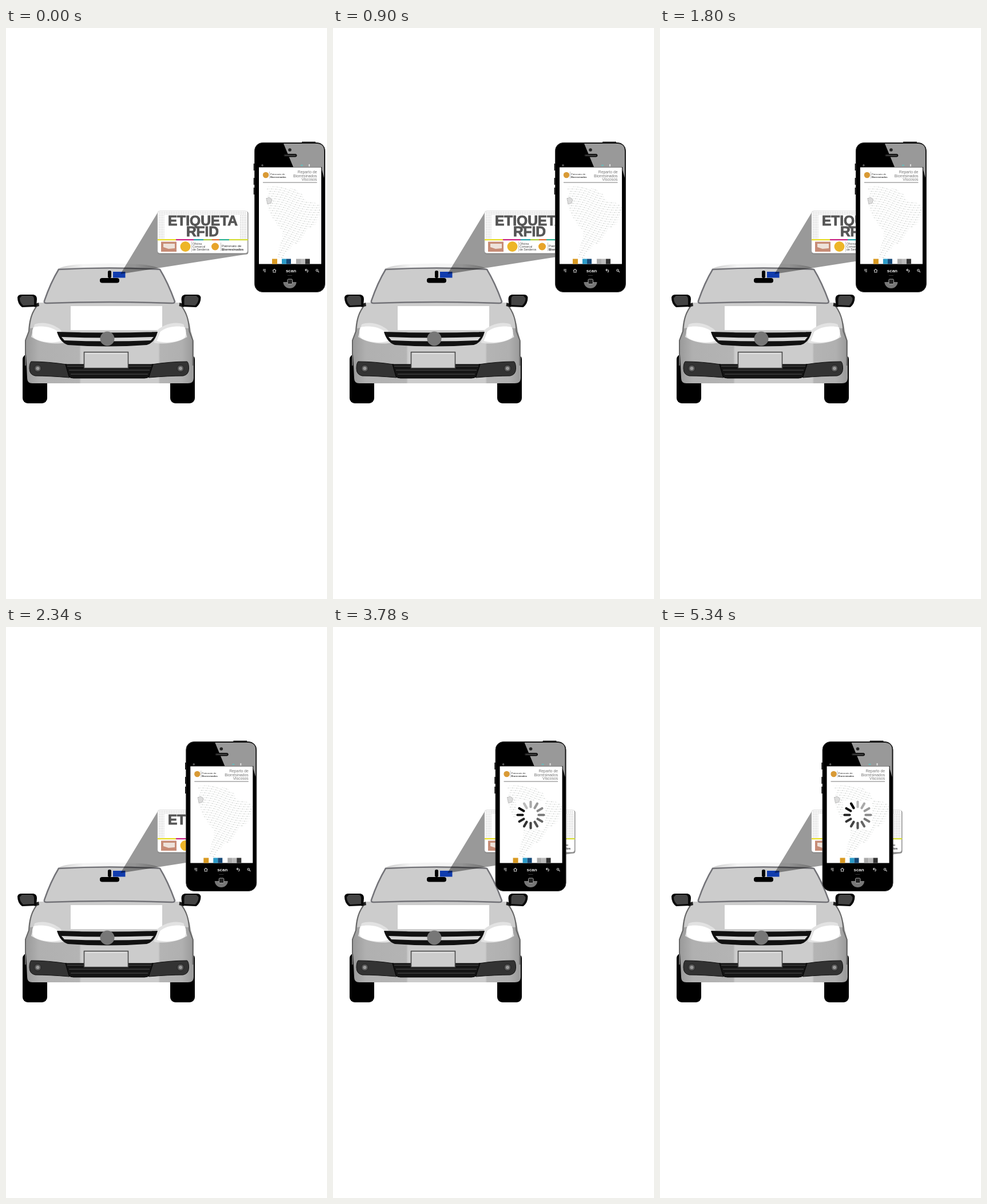
Recreate the animation shown at these times as an HTML page. Size 561x998 px, loop 5.4 s.

```html
<!DOCTYPE html>
<html lang="es">
<head>
<meta charset="utf-8">
<title>Etiqueta RFID</title>
<style>
html, body { margin: 0; width: 100%; height: 100%; overflow: hidden; background: #fff; }
svg { display: block; width: 100vw; height: 100vh; font-family: "Liberation Sans", Arial, sans-serif; }
</style>
</head>
<body>
<svg viewBox="0 0 561 998">
  <defs>
    <linearGradient id="roof">
      <stop offset="0" stop-color="#ccc"/><stop offset=".25" stop-color="#f4f4f4"/>
      <stop offset=".75" stop-color="#f4f4f4"/><stop offset="1" stop-color="#bbb"/>
    </linearGradient>
    <linearGradient id="paint">
      <stop offset="0" stop-color="#999"/><stop offset=".08" stop-color="#b0b0b0"/>
      <stop offset=".32" stop-color="#b4b4b4"/><stop offset=".33" stop-color="#ccc"/>
      <stop offset=".79" stop-color="#ccc"/><stop offset=".8" stop-color="#b4b4b4"/>
      <stop offset=".93" stop-color="#b0b0b0"/><stop offset="1" stop-color="#999"/>
    </linearGradient>
    <clipPath id="land">
      <path d="M449 271L454 278 468 277 486 278 505 282 518 291 521 300 548 308 551 317 545 336 539 346 527 350 520 363 511 376 500 379 496 387 487 393 486 403 475 401 477 385 482 370 484 355 473 343 462 326 457 312 455 300 460 288Z"/>
    </clipPath>
    <g id="side">
      <path d="M57 482C45 496 41 510 40 530L34 546V590" fill="none" stroke="#666" stroke-width="2"/>
      <path d="M50 518C66 512 84 518 96 528L102 550C82 554 60 550 44 540Z" fill="#e2e2e2"/>
      <path d="M48 523C64 519 82 523 91 531L97 547C82 552 58 549 48 541Q44 532 48 523Z" fill="#fff"/>
      <path d="M48 483L57 480 58 486 50 488Z" fill="#222"/>
      <path d="M27 466H48Q54 467 54 474L53 487 28 488Q20 482 20 471Q21 466 27 466Z" fill="#080808"/>
      <path d="M28 468H45Q49 469 49 474V484L30 485Q24 480 24 472Z" fill="#444"/>
      <path d="M44 583Q72 583 106 588L111 611Q75 608 51 608Q41 606 41 595Q41 586 44 583Z" fill="#333" stroke="#111"/>
      <circle cx="55.500" cy="595" r="6" fill="#555" stroke="#222"/>
      <circle cx="55.500" cy="595" r="3" fill="#999"/>
    </g>
  </defs>

  <g id="car">
    <rect x="29" y="570" width="43" height="86" rx="9"/>
    <rect x="287" y="570" width="43" height="86" rx="9"/>
    <path d="M55 482H304Q320 502 323 530L328 548V612Q328 621 318 621H46Q37 621 37 612L34 548 40 530Q42 502 55 482Z" fill="url(#paint)"/>
    <path d="M57 480H303Q317 500 321 525Q290 522 268 531H94Q68 519 42 525Q44 498 57 480Z" fill="#ccc"/>
    <path d="M113 486H273V528H113Z" fill="#fff"/>
    <path d="M90 422Q98 415 130 413Q181 410 232 413Q262 415 270 422Z" fill="url(#roof)"/>
    <path d="M92 422Q181 417 269 422Q283 445 295 478Q295 481 290 481Q181 477 71 481Q66 481 67 477Q78 445 92 422Z" fill="#ccc" stroke="#737378" stroke-width="2.500"/>
    <rect x="178" y="424" width="6" height="13" rx="2.500"/>
    <rect x="164" y="437" width="34" height="8.500" rx="4"/>
    <rect x="187" y="426" width="21.500" height="10.500" fill="#103cae"/>
    <use href="#side"/>
    <use href="#side" transform="translate(360.500 0) scale(-1 1)"/>
    <path d="M89 531Q177 534 265 531Q260 550 246 554Q177 559 108 554Q94 549 89 531Z" fill="#111"/>
    <path d="M97 540Q177 543 258 540L253 546Q177 549 102 546Z" fill="#d6d6d6"/>
    <circle cx="177" cy="543" r="12.500" fill="#777"/>
    <path d="M104 588H257L250 609Q248 612 242 612H118Q112 612 110 609Z" fill="#151515" stroke="#000"/>
    <path d="M107 591H254M110 598H251M113 605H248" stroke="#555"/>
    <rect x="136.500" y="566.500" width="77" height="28" fill="#ccc" stroke="#444" stroke-width="1.500"/>
    <path d="M139 569H211" stroke="#eee"/>
  </g>

  <path d="M200 430L266 321 423 395Z" opacity=".4"/>

  <g id="card">
    <rect x="265" y="320.500" width="158.500" height="75" rx="4" fill="#888"/>
    <rect x="265" y="319.500" width="157" height="74" rx="4" fill="#fff" stroke="#ccc" stroke-width=".6"/>
    <g id="print" stroke="#bbb" stroke-width="1" stroke-dasharray="2 1"></g>
    <g font-size="24.500" font-weight="700" text-anchor="middle" fill="#555" stroke="#555" stroke-width=".9">
      <text x="344" y="345">ETIQUETA</text>
      <text x="343.500" y="364">RFID</text>
    </g>
    <g id="strip"></g>
    <rect x="271" y="373.500" width="27" height="17.500" fill="#c78c76"/>
    <path d="M275 377H295V385L284 386 275 383Z" fill="#eee2da"/>
    <circle cx="313.500" cy="382" r="9" fill="#edb528"/>
    <path d="M324.500 373V391" stroke="#999" stroke-width=".6"/>
    <g font-size="5.200" fill="#444">
      <text x="326" y="379">Oficina</text>
      <text x="326" y="384">Comarcal</text>
      <text x="326" y="389">de Senderos</text>
    </g>
    <circle cx="365.500" cy="382" r="6.500" fill="#e7a42a"/>
    <path d="M375.500 375V390" stroke="#999" stroke-width=".6"/>
    <g font-size="6" fill="#333">
      <text x="377" y="382.500">Patronato de</text>
      <text x="377" y="389" font-weight="700" font-size="5.700">Biorresinados</text>
    </g>
  </g>

  <g id="phone">
    <path d="M517 200H541M434 237V249M434 262V274M434 279V291" stroke="#000" stroke-width="2.500"/>
    <rect x="434.500" y="200.500" width="123" height="261" rx="14" stroke="#333"/>
    <path d="M485 202H544Q556 203 556 215V262L552 248V243H502Z" fill="#999"/>
    <circle cx="496" cy="213" r="2.800" fill="#222"/>
    <rect x="485" y="220.500" width="23" height="4.500" rx="2.200" fill="#222" stroke="#000"/>
    <path d="M488 222.700H505" stroke="#777" stroke-dasharray="1 1"/>
    <path d="M446 240H450M448 238V242" stroke="#777"/>
    <path d="M515 240H519" stroke="#6bb" stroke-width="2"/>
    <path d="M530 238V242" stroke="#ddd" stroke-width="2"/>
    <rect x="442" y="243.500" width="109" height="169" fill="#fff"/>
    <circle cx="454" cy="257" r="5.200" fill="#d99a35"/>
    <path d="M460.500 251V263" stroke="#999" stroke-width=".6"/>
    <g font-size="4.400" fill="#333">
      <text x="462" y="257">Patronato de</text>
      <text x="462" y="261.500" font-weight="700" font-size="4.100">Biorresinados</text>
    </g>
    <g font-size="6.800" fill="#777" text-anchor="end">
      <text x="543.500" y="254">Reparto de</text>
      <text x="543.500" y="260.500">Biorresinados</text>
      <text x="543.500" y="267">Viscosos</text>
    </g>
    <path d="M449 270H543.500" stroke="#bbb" stroke-width="1.800"/>
    <g id="map" clip-path="url(#land)" fill="none" stroke="#c3c8c5" stroke-width=".9"></g>
    <path d="M455 298L460 296 465 300 463 306 457 308Z" fill="#ddd" stroke="#aaa" stroke-dasharray="2 1"/>
    <g id="swatches"></g>
    <g fill="none" stroke="#ccc" stroke-width="1.100">
      <path d="M449 422H454M449 424H454M451 426H454M466 424L469 421.500 472 424M467 424V427H471V424M523 423H527Q529 425 526 427M525 421L523 423 525 425"/>
      <circle cx="543.500" cy="423.500" r="1.700"/>
      <path d="M545 425L547 427"/>
    </g>
    <text x="498" y="427" font-size="8" font-weight="700" fill="#eee" text-anchor="middle">scan</text>
    <path d="M492 432.500H500" stroke="#333"/>
    <path d="M484.500 444H507.500A11.500 11 0 0 1 484.500 444Z" fill="#777"/>
    <rect x="492" y="439" width="8.500" height="8.500" rx="1.500" fill="#222" stroke="#aaa"/>
  </g>

  <g id="spinner" visibility="hidden">
    <rect x="320" y="303" width="51" height="51" fill="#fff"/>
  </g>
</svg>
<script>
const LOOP = 5400, SLIDE_STEP = 60, SLIDE_COUNT = 49, SLIDE_PX = 3.07;
const SPIN_START = 3060, SPIN_STEP = 120, SPOKES = 12;
const $ = id => document.getElementById(id);

function add(parent, tag, attrs) {
  const el = document.createElementNS("http://www.w3.org/2000/svg", tag);
  for (const key in attrs) el.setAttribute(key, attrs[key]);
  return parent.appendChild(el);
}

// Each band is [x, width, colour].
function bands(parent, y, height, list) {
  for (const [x, width, fill] of list) add(parent, "rect", { x, y, width, height, fill });
}

bands($("strip"), 369, 2.2, [
  [265, 32, "#e6dc20"], [297, 31, "#c81e82"], [328, 17, "#20a0a8"], [345, 15, "#a8cc38"],
  [360, 13, "#e06a30"], [373, 17, "#28b090"], [390, 33, "#d3dc30"]
]);
bands($("swatches"), 403.5, 9, [
  [465, 9, "#d99a22"], [482, 8, "#2a9bc8"], [490, 8, "#174a78"],
  [507, 8, "#aaa"], [515, 8, "#bbb"], [523, 8, "#333"]
]);

for (let y = 322; y < 368; y += 3) {
  const lines = y < 326 ? "M267 " + y + "H420" : `M267 ${y}H277M409 ${y}H420`;
  add($("print"), "path", { d: lines });
}

for (let i = 0; i < 38; i++) {
  const y = 245 + i * 4.2;
  add($("map"), "path", {
    d: `M446 ${y}q26 -5 52 6t56 8`,
    "stroke-dasharray": "3 1.5 1 2",
    "stroke-dashoffset": i * 2.3
  });
}

const spokes = Array.from({ length: SPOKES }, (_, i) => add($("spinner"), "line", {
  x1: 345.5, x2: 345.5, y1: 305.5, y2: 314.5,
  "stroke-width": 4.2, "stroke-linecap": "round",
  transform: `rotate(${i * 360 / SPOKES} 345.5 328.5)`
}));

function draw() {
  const t = performance.now() % LOOP;
  const slide = Math.min(SLIDE_COUNT, Math.floor(t / SLIDE_STEP));
  $("phone").setAttribute("transform", `translate(${-SLIDE_PX * slide} 0)`);

  const spin = Math.floor((t - SPIN_START) / SPIN_STEP);
  $("spinner").setAttribute("visibility", spin < 0 ? "hidden" : "visible");
  if (spin >= 0) {
    const head = spin + 4;
    spokes.forEach((spoke, i) => {
      const age = (head - i + SPOKES * 2) % SPOKES;
      const tone = Math.round(age * 17);
      spoke.setAttribute("stroke", `rgb(${tone},${tone},${tone})`);
    });
  }
  requestAnimationFrame(draw);
}
draw();
</script>
</body>
</html>
```
